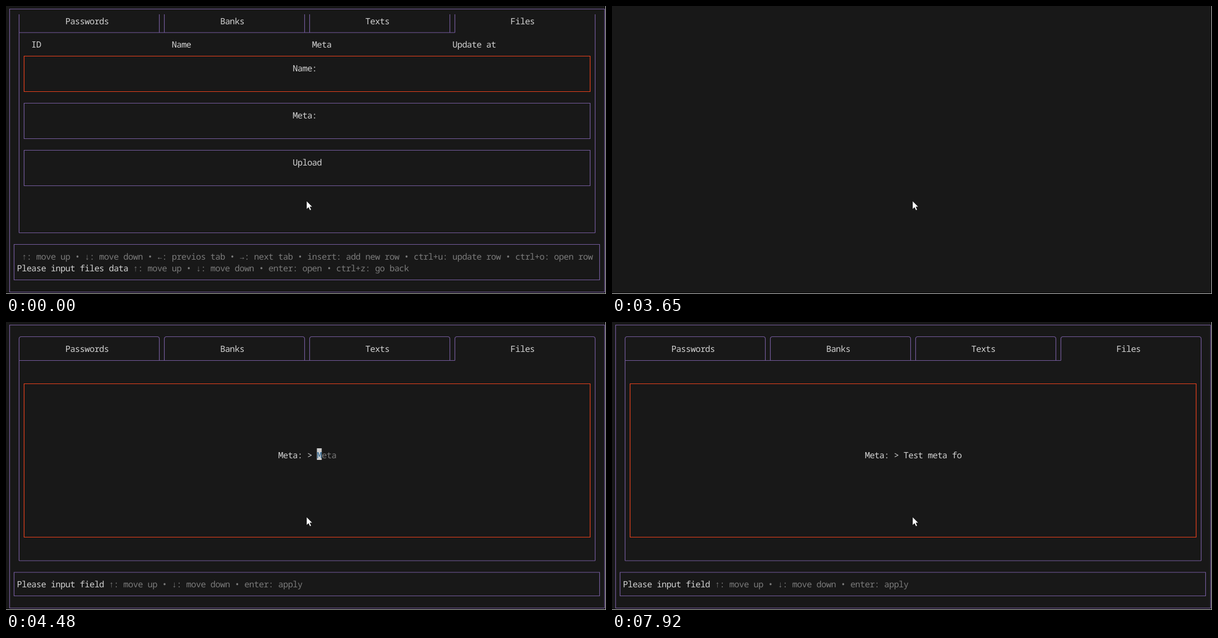
An HTML page for the animation above (8000 ms loop, 1078 by 520 pixels).

```html
<!DOCTYPE html>
<html lang="en">
<head>
<meta charset="utf-8">
<title>Terminal form</title>
<style>
  html, body { margin: 0; width: 100%; height: 100%; overflow: hidden; background: #181818; }
  svg { display: block; width: 100vw; height: 100vh; }
  text {
    font: 15.5px "Noto Sans Mono", "DejaVu Sans Mono", monospace;
    letter-spacing: -0.606px;
    white-space: pre;
    text-rendering: geometricPrecision;
  }
</style>
</head>
<body>
<svg viewBox="0 0 1078 520">
  <rect width="1078" height="520" fill="#181818"/>
  <g id="screen"></g>
  <path d="M1077.5 0V519.5H0" fill="none" stroke="#c0c0c0"/>
  <path d="M540 352v15l3.5-3.3 2.5 5.3 2.5-1.1-2.4-5.2h4.4z" fill="#fff" stroke="#000" stroke-width=".6"/>
</svg>
<script>
const LOOP = 8000;
const CELL = 8.694, ROW = 21.26, COLS = 124;
const INK = '#d2d2d2', DIM = '#7a7a7a', PURPLE = '#775da0', RED = '#ee421c', CURSOR = '#cccccc';
const TABS = [['Passwords', 12], ['Banks', 44], ['Texts', 74], ['Files', 104]];
const TAB_EDGES = [[23.5, 275.5], [284.5, 536.5], [545.5, 797.5], [806.5, 1058.5]];

const colX = col => 2.15 + CELL * col;
const rowY = row => 11.66 + ROW * row;
const centre = length => Math.floor((COLS - length) / 2);

const write = (str, col, row, fill = INK) =>
  `<text x="${colX(col).toFixed(2)}" y="${rowY(row).toFixed(2)}" fill="${fill}">${str.replace(/>/g, '&gt;')}</text>`;
const line = (d, stroke = PURPLE) =>
  `<path d="${d}" fill="none" stroke="${stroke}" stroke-width="1.15"/>`;
const box = (x1, y1, x2, y2, stroke) => line(`M${x1} ${y1}H${x2}V${y2}H${x1}Z`, stroke);

// The tab strip; when scrolled up one row its top is cut off.
function frame(scrolled) {
  const shift = scrolled ? 21.5 : 0;
  const base = 69 - shift + .5, bottom = scrolled ? 409.5 : 431;
  let out = box(6.5, 5.5, 1075.5, 516.5) + box(14.5, scrolled ? 430.5 : 452, 1066.5, 494.5);
  TAB_EDGES.forEach(([l, r], i) => {
    const endL = i === 0 ? bottom : base, endR = i === 3 ? bottom : base;
    out += scrolled
      ? line(`M${l} 15V${endL}M${r} 15V${endR}`)
      : line(`M${l} ${endL}V30.5Q${l} 26.5 ${l + 4} 26.5H${r - 4}Q${r} 26.5 ${r} 30.5V${endR}`);
  });
  out += line(`M23.5 ${base}H806.5M23.5 ${bottom}H1058.5`);
  TABS.forEach(([name, col]) => out += write(name, col, scrolled ? 1 : 2));
  return out;
}

const fieldHelp = () =>
  write('Please input field', 2, 22) +
  write('↑: move up • ↓: move down • enter: apply', 21, 22, DIM);

function form(name, active) {
  return [name, 'Meta:', 'Upload'].map((label, i) => {
    const top = 90.5 + 85 * i;
    return box(32.5, top, 1049.5, top + 64, i === active ? RED : PURPLE) +
      write(label, centre(label.length), 5 + 4 * i);
  }).join('');
}

const listScreen = () => frame(true) +
  [['ID', 5], ['Name', 34], ['Meta', 63], ['Update at', 92]].map(([s, c]) => write(s, c, 3)).join('') +
  form('Name:', 0) +
  write('↑: move up • ↓: move down • ←: previos tab • →: next tab • insert: add new row • ctrl+u: update row • ctrl+o: open row', 3, 21, DIM) +
  write('Please input files data', 2, 22) +
  write('↑: move up • ↓: move down • enter: open • ctrl+z: go back', 26, 22, DIM);

const formScreen = active => frame(false) + form('Name: TestFile', active) + fieldHelp();

const block = col => `<rect x="${colX(col)}" y="228" width="${CELL}" height="21" fill="${CURSOR}"/>`;

function inputScreen(label, value, cursorOn = true) {
  const prompt = label + ': > ';
  let out = frame(false) + box(32.5, 111.5, 1049.5, 388.5, RED) + fieldHelp();
  if (!value) {
    const col = centre(prompt.length + label.length), at = col + prompt.length;
    return out + write(prompt, col, 11) + block(at) +
      write(label[0], at, 11, '#2f6690') + write(label.slice(1), at + 1, 11, DIM);
  }
  const full = prompt + value;
  // A hidden cursor leaves trailing blanks, which the centring ignores.
  const col = centre(cursorOn ? full.length + 1 : full.trimEnd().length);
  return out + write(full, col, 11) + (cursorOn ? block(col + full.length) : '');
}

const name = (value, on) => () => inputScreen('Name', value, on);
const meta = (value, on) => () => inputScreen('Meta', value, on);

const STEPS = [
  [0, listScreen],
  [1280, name('')],
  [2240, name('Te')],
  [2520, name('Test')],
  [2800, name('TestF')],
  [2920, name('TestFi')],
  [3380, name('TestFil')],
  [3500, name('TestFile')],
  [3650, () => ''],
  [3770, () => formScreen(0)],
  [4200, () => formScreen(1)],
  [4480, meta('')],
  [5220, meta('T')],
  [5370, meta('Te')],
  [5490, meta('Tes')],
  [5640, meta('Test ')],
  [6170, meta('Test ', false)],
  [6440, meta('Test m')],
  [6560, meta('Test me')],
  [6840, meta('Test meta')],
  [7090, meta('Test meta ')],
  [7340, meta('Test meta f')],
  [7490, meta('Test meta fo')],
  [7920, meta('Test meta fo', false)]
];

const screenNode = document.getElementById('screen');
let shown = null;

function render(time) {
  const step = STEPS.findLast(([start]) => start <= time);
  if (step === shown) return;
  shown = step;
  screenNode.innerHTML = step[1]();
}

const startTime = performance.now();
function tick() {
  render((performance.now() - startTime) % LOOP);
  requestAnimationFrame(tick);
}
tick();
</script>
</body>
</html>
```
